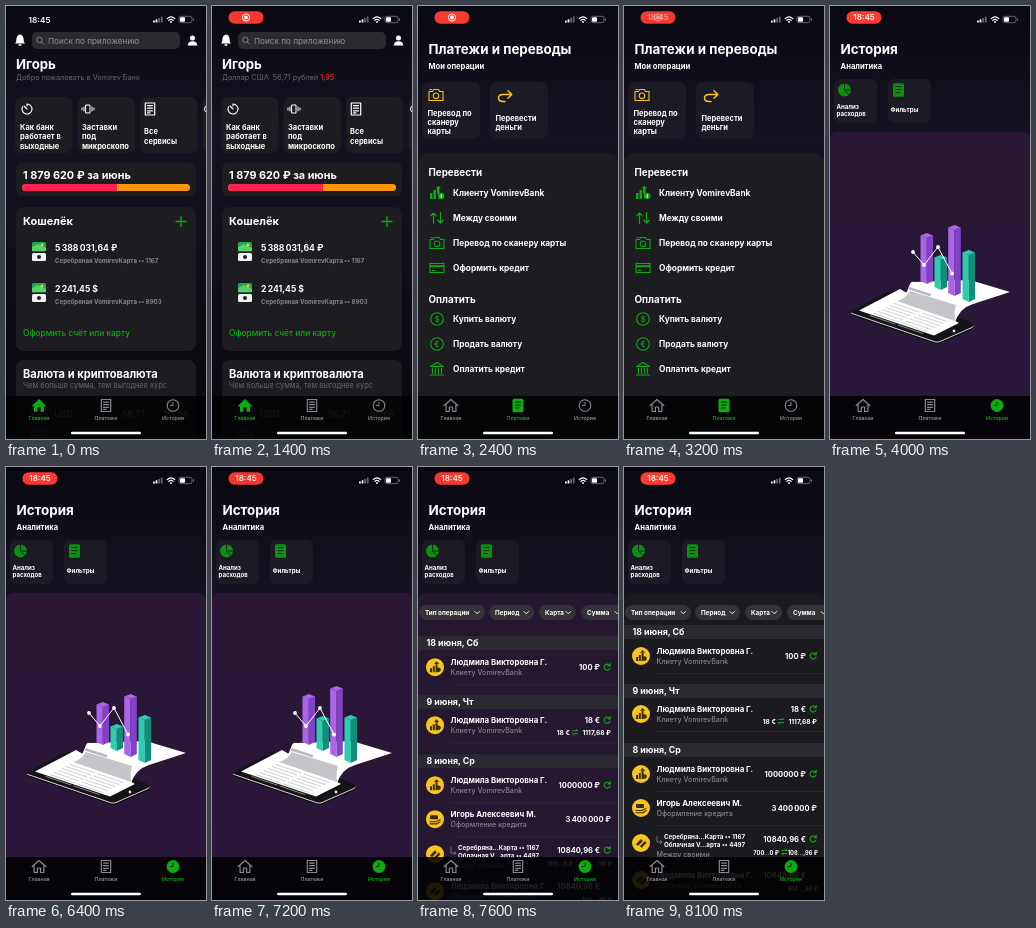
Animation of 200 by 433 pixels, one loop 8.2 s. Source, as an HTML page:

```html
<!DOCTYPE html>
<html lang="ru">
<head>
<meta charset="utf-8">
<style>
html, body { margin: 0; height: 100%; overflow: hidden; background: #08070d; }
svg { display: block; width: 100vw; height: 100vh; }
text { font-family: Inter, Roboto, sans-serif; white-space: pre; }
</style>
</head>
<body>
<svg id="stage" viewBox="0 0 200 433"></svg>
<script>
const LOOP = 8200, WHITE = '#fff', GREY = '#85858b', CARD = '#1d1c21', TILE = '#1c1a24';
const GREEN = '#0dab0f', DIM_GREEN = '#0b9010', YELLOW = '#f7c51e', RED = '#ff3b30';

// Drawing helpers
const text = (x, y, s, size, weight = 700, fill = WHITE, anchor = 'start') =>
  `<text x="${x}" y="${y}" font-size="${size}" font-weight="${weight}" fill="${fill}" text-anchor="${anchor}">${s}</text>`;
const lines = (x, y, step, rows, size) => rows.map((s, i) => text(x, y + i * step, s, size)).join('');
const rect = (x, y, w, h, r, fill) =>
  `<rect x="${x}" y="${y}" width="${w}" height="${h}" rx="${r}" fill="${fill}"/>`;
const dot = (x, y, r, fill) => `<circle cx="${x}" cy="${y}" r="${r}" fill="${fill}"/>`;
const ring = (x, y, r, color, w = 1) =>
  `<circle cx="${x}" cy="${y}" r="${r}" fill="none" stroke="${color}" stroke-width="${w}"/>`;
const line = (d, color, w = 1) =>
  `<path d="${d}" fill="none" stroke="${color}" stroke-width="${w}" stroke-linecap="round" stroke-linejoin="round"/>`;
const shape = (d, fill) => `<path d="${d}" fill="${fill}"/>`;
const at = (x, y, body) => `<g transform="translate(${x} ${y})">${body}</g>`;
const group = (id, body) => `<g id="${id}">${body}</g>`;

// Icons, each centred on 0,0
const icon = {
  bell: shape('M-5 3.5Q-3.5 2-3.5-1.5Q-3-5 0-5.5Q3-5 3.5-1.5Q3.5 2 5 3.5ZM-1.8 4.3H1.8Q1.4 6 0 6T-1.8 4.3Z', WHITE),
  person: dot(0, -2.4, 2.5, WHITE) + shape('M-4.8 5Q-4.5 .7 0 .7T4.8 5Z', WHITE),
  search: ring(-.6, -.6, 2.7, GREY) + line('M1.5 1.5L3.6 3.6', GREY),
  timer: line('M0-5A5 5 0 1 1-4.5-2.2M0-5V-3M0 0L-3-3', WHITE, 1.1),
  phone: line('M-2-4H2V4H-2ZM-4-2V2M4-2V2M-6-1V1M6-1V1', WHITE),
  doc: c => line('M-4.7-6H4.7V6H-4.7ZM-2.5-3.4H2.5M-2.5-.8H2.5M-2.5 1.8H2.5M-2.5 3.8H0', c, 1.2),
  docFull: c => rect(-5.5, -6.8, 11, 13.6, 1.5, c) + line('M-2.5-3.5H2.5M-2.5-.5H2.5M-2.5 2.5H1', '#0c260f', 1),
  house: c => line('M-6.8 0L0-6L6.8 0M-4.9-1V6H-1.6V1.5H1.6V6H4.9V-1', c, 1.2),
  houseFull: c => shape('M-7.2 .4L0-6.6L7.2 .4L6 1.2L5 .5V6.2H1.6V1.8H-1.6V6.2H-5V.5L-6 1.2Z', c),
  clock: c => ring(0, 0, 5.8, c, 1.1) + line('M0-3.2V0H-2.6', c, 1),
  clockFull: c => dot(0, 0, 6.4, c) + line('M0-3.4V0H-2.8', '#0c260f', 1),
  camera: c => line('M-7-3.5H-3.5L-2.5-5.5H2.5L3.5-3.5H7V5.5H-7ZM-6-5.5H-4.5', c, 1.1) + ring(0, .8, 2.8, c, 1.1),
  turn: line('M6.5-1.5H-2Q-6.5-1.5-6.5 2T-2 5.5H0M3-5.2L6.8-1.5L3 2.2', YELLOW, 1.5),
  client: c => shape('M-7 0H-4.5V6H-7ZM-3.5-3H-1V6H-3.5ZM0-5H2.5V1H0ZM-1.5-4.5L1.3-7.2L4-4.5Z', c) + dot(4.2, 3, 3.3, c) + line('M4.2 1.5V4.5', WHITE, .9),
  swap: c => line('M-3.5 5.5V-5M-6.3-2.2L-3.5-5L-.7-2.2M3.5-5.5V5M.7 2.2L3.5 5L6.3 2.2', c, 1.2),
  card: c => line('M-7-4.5H7V4.5H-7ZM-5 2.5H-2', c, 1.1) + rect(-7, -2.8, 14, 2, 0, c),
  coin: (c, s) => ring(0, 0, 6.3, c, 1.1) + text(0, 3, s, 8, 500, c, 'middle'),
  bank: c => line('M-6.5-2.5L0-6.5L6.5-2.5ZM-6.5 6H6.5M-4.5-1V4.5M-1.5-1V4.5M1.5-1V4.5M4.5-1V4.5', c, 1.1),
  pie: dot(0, 0, 6.5, DIM_GREEN) + line('M0-6.5V0L4.6 4.6M0 0H6.5', '#10251a', 1),
  refresh: line('M2.8-1.5A3 3 0 1 0 3 1M3.2-3.6V-1.3H.9', GREEN, 1.1),
  exchange: line('M-2.5-1.5H2.7L1.2-3M2.5 1.5H-2.7L-1.2 3', GREEN, 1),
  transfer: dot(0, 0, 9, YELLOW) + shape('M-5 1H-3V5H-5ZM-2.2-1H-.2V5H-2.2ZM.6-3H2.6V5H.6ZM-1-3.3L1.6-6L4.2-3.3Z', '#3a2d08') + dot(3.6, 2.5, 2.2, '#3a2d08'),
  credit: dot(0, 0, 9, YELLOW) + rect(-5, -4, 8, 4, 1, '#3a2d08') + line('M-5 2.5H1L5 .5M-5 4.7H2L5 2.5', '#3a2d08', 1.1),
  between: dot(0, 0, 9, YELLOW) + shape('M-5 1L0-4L2-2L-3 3ZM-1 3L4-2L5.5 0L.5 5Z', '#3a2d08')
};

const account = (y, sum, digits) =>
  rect(26, y - 5, 14, 9.5, 1.5, '#19aa4c') + shape(`M26 ${y}l6-3 8 4v3H26Z`, '#58cf6b') +
  dot(36, y - 2, 1.4, '#f1cc39') + rect(26, y + 6, 14, 8, 1.5, '#f2f2f2') + dot(33, y + 10, 2, '#222') +
  text(49, y + 3.5, sum, 8.6) + text(49, y + 15.5, `Серебряная VomirevКарта •• ${digits}`, 6.1, 700, GREY);

const home =
  at(14, 34, icon.bell) + rect(26, 26, 148, 17, 5, '#2b2a2f') + at(34, 34.5, icon.search) +
  text(42, 37.5, 'Поиск по приложению', 8.2, 400, '#929298') + at(186.5, 34.5, icon.person) +
  text(10, 63, 'Игорь', 13.2) +
  group('hello', text(10, 73.5, 'Добро пожаловать в Vomirev Банк', 7.3, 400, '#66656d')) +
  group('rate', text(10, 73.5, 'Доллар США: 56,71 рублей <tspan fill="#ff3038">1,95</tspan>', 7.3, 400, '#66656d')) +
  [9, 71.5, 134, 196.5].map(x => rect(x, 91, 57.5, 56, 7, CARD)).join('') +
  at(21, 103, icon.timer) + lines(14, 123.5, 9.5, ['Как банк', 'работает в', 'выходные'], 7.5) +
  at(82, 103, icon.phone) + lines(76, 123.5, 9.5, ['Заставки', 'под', 'микроскопо'], 7.5) +
  at(144, 103, icon.doc(WHITE)) + lines(138, 128, 9.5, ['Все', 'сервисы'], 7.5) +
  ring(202, 103, 3.5, WHITE) +
  rect(10, 157, 180, 33, 6, CARD) + text(17, 173, '1 879 620 ₽ за июнь', 10.8) +
  rect(16, 178, 168, 7, 3.5, '#ff9608') + shape('M19.5 178H111V185H19.5A3.5 3.5 0 0 1 19.5 178Z', '#ff2150') +
  rect(10, 201, 180, 144, 8, CARD) + text(17, 219, 'Кошелёк', 11) +
  line('M170 215.5H180M175 210.5V220.5', GREEN, 1.3) +
  account(241, '5\u2009388\u2009031,64 ₽', 1167) + account(282, '2\u2009241,45 $', 8903) +
  text(17, 330, 'Оформить счёт или карту', 8.4, 500, GREEN) +
  rect(10, 354, 180, 90, 8, CARD) + text(17, 372, 'Валюта и криптовалюта', 11.1) +
  text(17, 382, 'Чем больше сумма, тем выгоднее курс', 7.4, 400, '#66656d') +
  dot(33, 407, 9, '#41414b') + text(48, 410.5, 'USD', 9, 500, '#999') +
  text(116, 410.5, '56,71', 9, 500, '#999') + text(158, 410.5, '58,66', 9, 500, '#999') + dot(33, 431, 9, '#41414b');

const heading = s => text(10.5, 48, s, 13.4);
const item = (y, pic, s) => at(19, y, pic) + text(35, y + 3, s, 8.3);
const payments =
  heading('Платежи и переводы') + text(10.5, 62.5, 'Мои операции', 7.6) +
  rect(4, 76, 58, 57, 7, TILE) + rect(72, 76, 58, 57, 7, TILE) +
  at(18, 89, icon.camera(YELLOW)) + lines(9.5, 109.5, 9.2, ['Перевод по', 'сканеру', 'карты'], 7.5) +
  at(87, 90, icon.turn) + lines(77.5, 114.5, 9.2, ['Перевести', 'деньги'], 7.5) +
  rect(0, 147, 200, 300, 10, '#1d1c20') +
  text(10.5, 170, 'Перевести', 9.8) +
  item(187, icon.client(GREEN), 'Клиенту VomirevBank') +
  item(212, icon.swap(GREEN), 'Между своими') +
  item(237, icon.camera(GREEN), 'Перевод по сканеру карты') +
  item(262, icon.card(GREEN), 'Оформить кредит') +
  text(10.5, 296.5, 'Оплатить', 9.8) +
  item(313, icon.coin(GREEN, '$'), 'Купить валюту') +
  item(338, icon.coin(GREEN, '€'), 'Продать валюту') +
  item(363, icon.bank(GREEN), 'Оплатить кредит');

const bar = (x, top, base, light, dark) =>
  shape(`M${x} ${top + 2.5}l6.3 2.5V${base}L${x} ${base - 3}Z`, light) +
  shape(`M${x + 12.6} ${top + 2.5}l-6.3 2.5V${base}l6.3-3Z`, dark) +
  shape(`M${x} ${top + 2.5}l6.3-2.5l6.3 2.5l-6.3 2.5Z`, light);
const purple = ['#ad65e8', '#8242c8'], teal = ['#2fcdb0', '#0f8f7a'];

// Text rows on the tablet follow its slanted front edge
const print = (x, y, w) => line(`M${x} ${y}l${w} ${w * .34}`, '#b9b9bd', .7);
let prints = '';
for (let i = 0; i < 7; i++)
  prints += print(64 - i * 4, 297.5 + i * 2, 25) + print(92 - i * 4, 307 + i * 2, 25);
const tablet = 'M22 304.5L62 284L142 317Q145 319 142 321L110 335Q107 336 104 335L22 307Q20 306 22 304.5Z';
const picture =
  at(0, 2.2, shape(tablet, '#08080b')) + at(0, 1.1, shape(tablet, '#d9d9de')) + shape(tablet, '#141418') +
  shape('M29 304.5L70 283L129 317L104 329.5Z', '#fff') +
  shape('M66 297Q75 293 80 278Q81 275 85 276L140 274L180 286L143 298Q130 302 125 316Z', '#fff') +
  shape('M67 295Q75 293 80 285L126 299Q124 304 125 315Z', '#c5c5c9') +
  line('M80 282.5L100 289', '#b9b9bd', 2.4) + prints + dot(124, 325, 1.4, '#e4e4e8') +
  group('bars', '') +
  line('M83 246L94 259L108 241L122 267.5', WHITE, 1) +
  [[83, 246], [94, 259], [108, 241], [122, 267.5]].map(p => dot(...p, 1.9, WHITE)).join('');

const chip = (x, w, s) => rect(x, 138, w, 15, 7.5, '#343338') + text(x + 6, 147.8, s, 6.3) +
  line(`M${x + w - 10} 144.5l2.3 2.3l2.3-2.3`, WHITE, .9);
const day = (y, s) => rect(0, y - 7, 200, 14, 0, '#2b2a30') + text(8.5, y + 3.2, s, 8.8);
const entry = (y, pic, name, note) =>
  at(17, y, pic) + text(32.5, y - 2, name, 7.9) + text(32.5, y + 7.6, note, 7.1, 500, GREY) +
  rect(33, y + 17.5, 167, .5, 0, '#36343c');
const sum = (x, y, s, size = 7.6) => text(x, y + 2.8, s, size, 700, WHITE, 'end');
const again = y => at(189, y, icon.refresh);
const lady = 'Людмила Викторовна Г.', toClient = 'Клиету VomirevBank';
const rows =
  day(165, '18 июня, Сб') + entry(189, icon.transfer, lady, toClient) + sum(182, 189, '100 ₽') + again(189) +
  day(224, '9 июня, Чт') + entry(247, icon.transfer, lady, toClient) + sum(182, 242, '18 €') + again(242) +
  sum(152, 254, '18 €', 6.6) + at(157, 254, icon.exchange) + sum(193, 254, '1117,68 ₽', 6.6) +
  day(283, '8 июня, Ср') + entry(307, icon.transfer, lady, toClient) + sum(182, 307, '1000000 ₽') + again(307) +
  entry(341, icon.credit, 'Игорь Алексеевич М.', 'Оформление кредита') + sum(193, 341, '3\u2009400\u2009000 ₽') +
  at(17, 376, icon.between) + line('M33 369V375H38M36.3 373.3L38 375L36.3 376.7', GREY, .8) +
  text(40, 372, 'Серебряна...Карта •• 1167', 6.2) + text(40, 380, 'Облачная V...арта •• 4497', 6.2) +
  text(32.5, 390, 'Между своими', 7.1, 500, GREY) + sum(182, 372, '10840,96 €') + again(372) +
  sum(155, 385, '700...0 ₽', 5.7) + at(160.5, 385, icon.exchange) + sum(194, 385, '108...,96 ₽', 5.7) +
  entry(413, icon.between, lady, 'Облачная VomirevКарта') + sum(182, 408, '10840,96 €') + sum(194, 421, '108...,96 ₽', 5.7);

const history =
  heading('История') + text(10.5, 62.5, 'Аналитика', 7.6) +
  rect(4, 73, 43, 44, 6, TILE) + rect(58, 73, 43, 44, 6, TILE) +
  at(14.5, 84, icon.pie) + lines(6.5, 103, 7, ['Анализ', 'расходов'], 6.1) +
  at(68.5, 84, icon.docFull(DIM_GREEN)) + text(60.5, 106, 'Фильтры', 6.1) +
  rect(0, 126, 200, 320, 8, '#1b1a1e') + group('tint', rect(0, 126, 200, 320, 8, 'url(#plum)')) +
  group('picture', picture) +
  group('list', `<g clip-path="url(#below)">${group('rows', rows)}</g>` +
    chip(1, 66, 'Тип операции') + chip(71, 45, 'Период') + chip(121, 37, 'Карта') + chip(163, 44, 'Сумма'));

const tabs = [[33, 'Главная', 'house'], [100, 'Платежи', 'doc'], [167, 'История', 'clock']];
const tabIcons = active => tabs.map(([x, label, pic], i) => {
  const on = i === active, color = on ? GREEN : '#88888e';
  return at(x, 399.5, icon[on ? pic + 'Full' : pic](color)) + text(x, 413.5, label, 5.2, 600, color, 'middle');
}).join('');

const status =
  group('time', text(33.5, 16.5, '18:45', 8.2, 600, WHITE, 'middle')) +
  group('pill', rect(16.5, 5.3, 35, 12.4, 6.2, RED) +
    group('record', ring(34, 11.5, 3.6, WHITE, 1) + dot(34, 11.5, 1.9, WHITE)) +
    group('pillTime', text(34, 14.4, '18:45', 8, 600, WHITE, 'middle'))) +
  [2, 3.2, 4.6, 6].map((h, i) => rect(147 + i * 2.6, 16.5 - h, 1.8, h, .5, i < 2 ? WHITE : '#66656c')).join('') +
  line('M161.2 12.6Q165 9.2 168.8 12.6M162.8 14.4Q165 12.5 167.2 14.4', WHITE, 1.2) + dot(165, 16, .9, WHITE) +
  `<rect x="173" y="10.3" width="13" height="6.4" rx="2" fill="none" stroke="#8b8a91" stroke-width=".7"/>` +
  rect(174, 11.3, 5, 4.4, 1, WHITE) + rect(187, 12.3, .9, 2.4, .4, '#8b8a91');

document.getElementById('stage').innerHTML = `<defs>
  <linearGradient id="sky" x2="0" y2="1"><stop stop-color="#0a0911"/><stop offset=".3" stop-color="#151321"/><stop offset="1" stop-color="#09080d"/></linearGradient>
  <linearGradient id="plum" x2="0" y2="1"><stop stop-color="#291735"/><stop offset="1" stop-color="#2a173b"/></linearGradient>
  <clipPath id="below"><rect y="155" width="200" height="278"/></clipPath></defs>` +
  rect(0, 0, 200, 433, 0, 'url(#sky)') +
  group('home', home) + group('payments', payments) + group('history', history) +
  rect(0, 390, 200, 43, 0, 'rgba(2,2,3,.88)') +
  group('tabs', '') + rect(65, 425.8, 70, 2.4, 1.2, WHITE) + status;

const $ = id => document.getElementById(id);
const clamp = v => Math.max(0, Math.min(1, v));
const ramp = (t, from, to) => clamp((t - from) / (to - from));
const fade = (id, v) => $(id).setAttribute('opacity', v);
const show = (id, on) => $(id).setAttribute('display', on ? 'inline' : 'none');
let shown = -1;

function draw(t) {
  const page = t < 2300 ? 0 : t < 3800 ? 1 : 2;
  if (page !== shown) {
    ['home', 'payments', 'history'].forEach((id, i) => show(id, i === page));
    $('tabs').innerHTML = tabIcons(page);
    shown = page;
  }
  const pill = ramp(t, 300, 600), clock = ramp(t, 3000, 3400), ticker = ramp(t, 900, 1200);
  fade('time', 1 - pill);
  fade('pill', pill * (.97 + .03 * Math.cos(t / 320)));
  fade('record', 1 - clock);
  fade('pillTime', clock);
  fade('hello', 1 - ticker);
  fade('rate', ticker);

  const loaded = t >= 7300, slide = ramp(t, 7300, 8000);
  show('picture', !loaded);
  show('list', loaded);
  fade('tint', 1 - ramp(t, 7400, 8000));
  fade('list', ramp(t, 7200, 7500));
  $('rows').setAttribute('transform', `translate(0 ${60 * (1 - slide) ** 3})`);

  const rise = 4 + 4 * Math.cos((t - 4000) / 1600 * 2 * Math.PI);
  $('bars').innerHTML = bar(90.5, 235 - rise, 278, ...purple) + bar(104.5, 257 - rise, 284, ...teal) +
    bar(118.2, 227 - rise, 290, ...purple) + bar(132.5, 244 + 4 * ramp(t, 5500, 6400), 296, ...teal);
}

function tick() {
  draw(Math.floor(performance.now() % LOOP / 100) * 100);
  requestAnimationFrame(tick);
}
tick();
</script>
</body>
</html>
```
